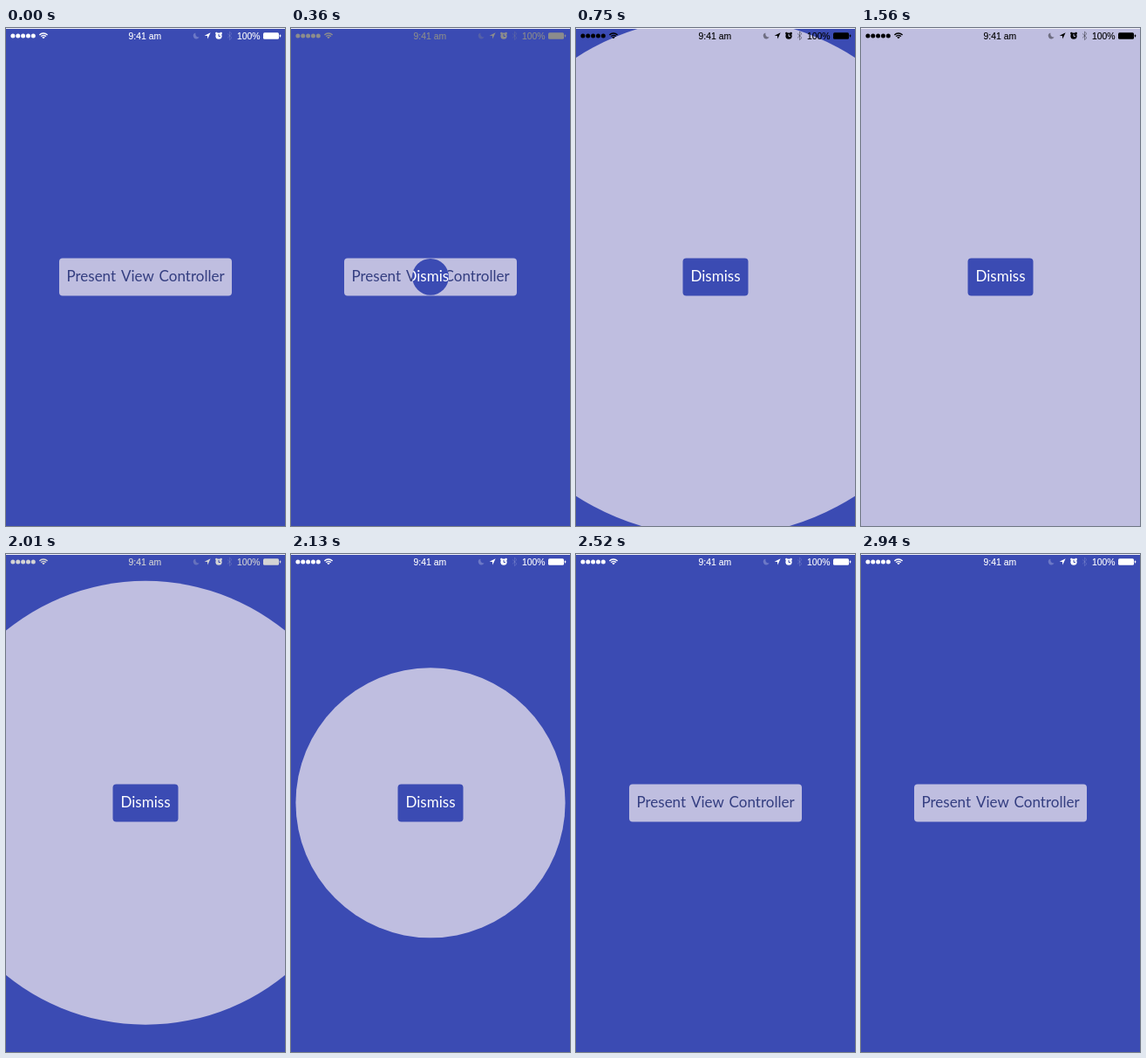
Animation, 320 px wide and 570 px high, one loop 3 s. Source, as an HTML page with a canvas:

```html
<!DOCTYPE html>
<html lang="en">
<head>
<meta charset="utf-8">
<title>Circular view transition</title>
<style>
  html, body { margin: 0; width: 100%; height: 100%; overflow: hidden; background: #3b4bb3; }
  canvas { display: block; width: 320px; height: 570px; }
</style>
</head>
<body>
<canvas id="stage"></canvas>
<script>
const W = 320, H = 570, LOOP = 3000, STEP = 30;
const BLUE = '#3b4bb3', LAVENDER = '#bfbee0', INK = '#343e80';
const CENTER = { x: 160, y: 284.8 };
const MAX_RADIUS = Math.hypot(W / 2, H / 2);
const OPEN_AT = 247, CLOSE_AT = 1802, MOVE_TIME = 636, FADE_TIME = 250;

const canvas = document.getElementById('stage');
const ctx = canvas.getContext('2d');
const ratio = window.devicePixelRatio || 1;
canvas.width = W * ratio;
canvas.height = H * ratio;

const clamp = v => Math.min(1, Math.max(0, v));
const mix = (a, b, k) => a + (b - a) * k;

// Cubic Bezier timing with control points (0.42, 0) and (0.58, 1)
function easeInOut(x) {
  if (x <= 0 || x >= 1) return clamp(x);
  let lo = 0, hi = 1;
  for (let i = 0; i < 24; i++) {
    const u = (lo + hi) / 2, v = 1 - u;
    if (3 * v * v * u * 0.42 + 3 * v * u * u * 0.58 + u * u * u < x) lo = u;
    else hi = u;
  }
  return lo * lo * (3 - 2 * lo);
}

function roundRect(x, y, w, h, r, color) {
  ctx.fillStyle = color;
  ctx.beginPath();
  ctx.roundRect(x, y, w, h, r);
  ctx.fill();
}

function disc(x, y, r) {
  ctx.beginPath();
  ctx.arc(x, y, r, 0, Math.PI * 2);
  ctx.fill();
}

function polyline(points) {
  ctx.beginPath();
  points.forEach(([x, y]) => ctx.lineTo(x, y));
}

function button(label, width, fill, textColor) {
  roundRect(CENTER.x - width / 2, 263.6, width, 42.9, 4, fill);
  ctx.font = '17px Lato, sans-serif';
  ctx.wordSpacing = '1.5px';
  ctx.textAlign = 'center';
  ctx.fillStyle = textColor;
  ctx.fillText(label, CENTER.x, 290.4);
  ctx.wordSpacing = '0px';
}

function wifi() {
  const x = 43, y = 12.3, from = -Math.PI * 0.76, to = -Math.PI * 0.24;
  ctx.lineWidth = 1.4;
  for (const r of [3.9, 6.3]) {
    ctx.beginPath();
    ctx.arc(x, y, r, from, to);
    ctx.stroke();
  }
  ctx.beginPath();
  ctx.moveTo(x, y);
  ctx.arc(x, y, 2.3, from, to);
  ctx.fill();
}

function alarmClock(holeColor) {
  disc(244, 9.2, 3.6);
  disc(241.4, 6.1, 1.3);
  disc(246.6, 6.1, 1.3);
  ctx.strokeStyle = holeColor;
  ctx.lineWidth = 1;
  polyline([[244, 7], [244, 9.5], [245.8, 9.5]]);
  ctx.stroke();
}

function statusBar(dark, backdrop) {
  const level = Math.round(255 * (1 - dark));
  const tone = alpha => `rgba(${level},${level},${level},${alpha})`;
  ctx.fillStyle = ctx.strokeStyle = tone(1);

  for (let i = 0; i < 5; i++) disc(7.9 + i * 5.85, 9, 2.5);
  wifi();

  ctx.font = '10.4px "Liberation Sans", Arial, sans-serif';
  ctx.lineWidth = 0.12;
  for (const [label, x] of [['9:41 am', 159.3], ['100%', 278.2]]) {
    ctx.fillText(label, x, 12.7);
    ctx.strokeText(label, x, 12.7);
  }

  polyline([[234.6, 5.2], [227.6, 8.8], [230.9, 9.1], [231.3, 12.6]]);
  ctx.fill();
  roundRect(295, 5.2, 18, 7.6, 1.5, tone(1));
  roundRect(313.8, 7.6, 1.4, 2.8, 0.7, tone(1));
  alarmClock(backdrop);

  // Moon and Bluetooth are dimmer than the other icons
  ctx.fillStyle = tone(mix(0.25, 0.42, dark));
  ctx.beginPath();
  ctx.arc(218.4, 8.8, 3.6, -Math.PI * 0.6, Math.PI * 0.15, true);
  ctx.quadraticCurveTo(217, 10.6, 217.3, 5.4);
  ctx.fill();
  ctx.strokeStyle = tone(mix(0.17, 0.42, dark));
  ctx.lineWidth = 0.9;
  polyline([[254, 6.4], [259, 11.3], [256.5, 13.6], [256.5, 4.2], [259, 6.5], [254, 11.4]]);
  ctx.stroke();
}

function draw(time) {
  const progress = (start, span) => (time - start) / span;
  const radius = MAX_RADIUS * (easeInOut(progress(OPEN_AT, MOVE_TIME)) -
                               easeInOut(progress(CLOSE_AT, MOVE_TIME)));
  const dark = clamp(progress(OPEN_AT, FADE_TIME)) - clamp(progress(CLOSE_AT, FADE_TIME));

  ctx.setTransform(ratio, 0, 0, ratio, 0, 0);
  ctx.fillStyle = BLUE;
  ctx.fillRect(0, 0, W, H);
  button('Present View Controller', 198, LAVENDER, INK);

  if (radius > 0) {
    ctx.save();
    ctx.beginPath();
    ctx.arc(CENTER.x, CENTER.y, radius, 0, Math.PI * 2);
    ctx.clip();
    ctx.fillStyle = LAVENDER;
    ctx.fillRect(0, 0, W, H);
    button('Dismiss', 75, BLUE, '#fff');
    ctx.restore();
  }

  statusBar(dark, radius > 288 ? LAVENDER : BLUE);
  ctx.fillStyle = '#f2f2f8';
  ctx.fillRect(0, 0, W, 1);
}

const startTime = performance.now();
function tick() {
  const elapsed = (performance.now() - startTime) % LOOP;
  draw(Math.floor(elapsed / STEP) * STEP);
  requestAnimationFrame(tick);
}
tick();
</script>
</body>
</html>
```
